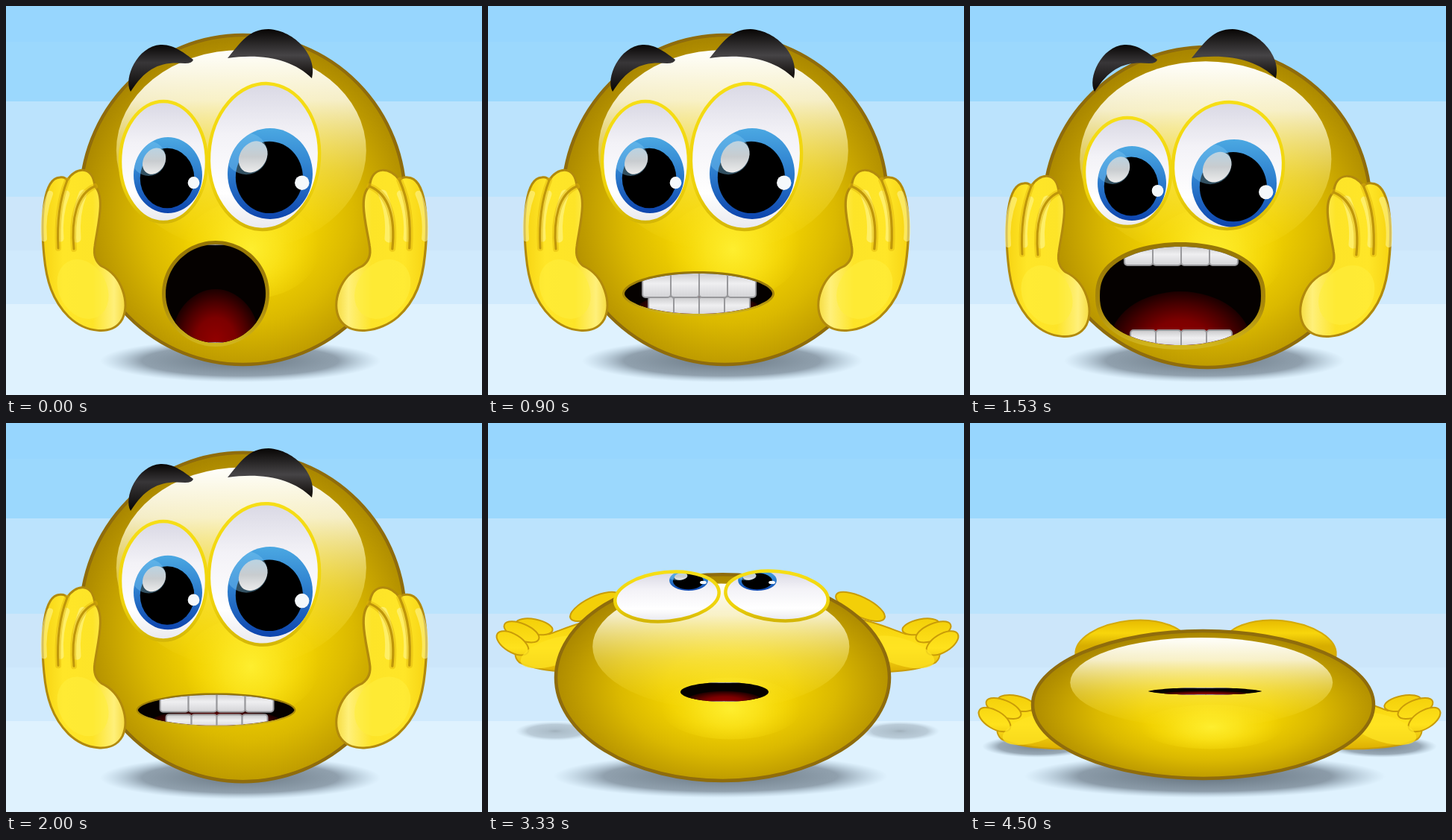
Recreate the animation shown at these times as an HTML page with a canvas. Size 638 by 522 pixels, loop 4.63 s.

```html
<!DOCTYPE html>
<html lang="en">
<head>
<meta charset="utf-8">
<title>Shocked smiley</title>
<style>
html, body { margin: 0; width: 100%; height: 100%; overflow: hidden; background: #bbe3fd; }
canvas { display: block; width: 638px; height: 522px; }
</style>
</head>
<body>
<canvas id="stage" width="638" height="522"></canvas>
<script>
const ctx = document.getElementById('stage').getContext('2d');
const LOOP = 4630;
const TAU = Math.PI * 2;

// head: left, right, top, bottom; eyes: cx, cy, rx, ry, tilt; irises: cx, cy, rx, ry
// mouth: cx, cy, rx, ry, power, upper teeth, lower teeth, rim width
// brow: dy, height; shadow: cx, cy, rx, ry, alpha
const calm = {
  head: [100, 535, 39, 481],
  eyeL: [211, 209, 58, 81, 0], eyeR: [346, 202, 74, 98, .06],
  irisL: [217, 227, 46, 51], irisR: [354, 225, 57, 61],
  mouth: [281, 386, 67, 66, 1, 0, 0, 5],
  brow: [0, 1], cheek: [0], side: [-200], lid: [0],
  shadow: [314, 476, 188, 29, .8]
};
const scream = {
  ...calm,
  head: [99, 537, 55, 485],
  eyeL: [211, 223, 58, 73, 0], eyeR: [346, 214, 74, 85, .06],
  irisL: [217, 238, 46, 50], irisR: [354, 238, 57, 59],
  mouth: [282, 389, 108, 66, .82, 25, 20, 6],
  cheek: [8]
};
const clenched = { ...calm, mouth: [282, 386, 99, 27, 1.1, 32, 23, 3] };
const dazed = {
  ...calm,
  eyeL: [211, 214, 58, 79, 0], eyeR: [346, 203, 74, 92, .06],
  irisL: [217, 227, 46, 48], irisR: [354, 227, 57, 60],
  mouth: [281, 384, 111, 8, 1.2, 12, 4, 1],
  brow: [7, 1]
};
const sinking = {
  ...calm,
  head: [91, 538, 203, 480],
  eyeL: [240, 233, 70, 33, -.1], eyeR: [387, 232, 69, 33, .1],
  irisL: [269, 211, 26, 14], irisR: [361, 211, 26, 14],
  mouth: [317, 361, 59, 13, 1, 0, 0, 0],
  brow: [135, 0], side: [-103],
  shadow: [312, 474, 224, 29, .8]
};
const tipping = {
  ...sinking,
  head: [87, 540, 231, 469],
  eyeL: [230, 236, 62, 0, -.1], eyeR: [402, 236, 62, 0, .1],
  irisL: [262, 230, 20, 0], irisR: [370, 230, 20, 0],
  mouth: [316, 344, 64, 10, 1.15, 0, 0, 0],
  side: [-35], lid: [.7]
};
const bounced = {
  ...tipping,
  head: [84, 541, 259, 457],
  mouth: [315, 328, 70, 8, 1.35, 0, 0, 0],
  side: [0], lid: [1],
  shadow: [313, 473, 240, 29, .95]
};
const flat = {
  ...bounced,
  head: [84, 541, 279, 477],
  mouth: [315, 360, 76, 5, 1.35, 0, 0, 0],
  shadow: [315, 474, 242, 29, .85]
};

const smooth = u => u * u * (3 - 2 * u);
const linear = u => u;
const speedUp = u => Math.pow(u, 1.4);
const slowDown = u => 1 - (1 - u) * (1 - u);

function blend(a, b, u) {
  const pose = {};
  for (const part in a) pose[part] = a[part].map((v, i) => v + (b[part][i] - v) * u);
  return pose;
}

// time, pose, easing toward that pose
const keys = [
  [30, calm],
  [450, { ...blend(calm, scream, .45), mouth: [281, 387, 86, 60, .9, 14, 10, 5] }, smooth],
  [900, clenched, smooth],
  [1530, scream, smooth],
  [2070, blend(clenched, dazed, .45), smooth],
  [2600, dazed, smooth],
  [2930, dazed, linear],
  [3330, sinking, speedUp],
  [3530, tipping, linear],
  [3730, bounced, linear],
  [4270, flat, slowDown]
];

function poseAt(t) {
  if (t <= keys[0][0]) return keys[0][1];
  for (let i = 1; i < keys.length; i++) {
    const [start, from] = keys[i - 1], [end, to, ease] = keys[i];
    if (t < end) return blend(from, to, ease((t - start) / (end - start)));
  }
  return flat;
}

function saved(draw) {
  ctx.save();
  draw();
  ctx.restore();
}

function ellipse(x, y, rx, ry, tilt = 0) {
  ctx.beginPath();
  ctx.ellipse(x, y, Math.max(rx, 0), Math.max(ry, 0), tilt, 0, TAU);
}

function paint(fill, stroke, width) {
  if (fill) { ctx.fillStyle = fill; ctx.fill(); }
  if (stroke) { ctx.strokeStyle = stroke; ctx.lineWidth = width; ctx.stroke(); }
}

function stops(gradient, list) {
  list.forEach(([at, color]) => gradient.addColorStop(at, color));
  return gradient;
}
const vertical = (y0, y1, ...list) => stops(ctx.createLinearGradient(0, y0, 0, y1), list);
const radial = (x, y, r, ...list) => stops(ctx.createRadialGradient(x, y, 0, x, y, r), list);

// Runs draw twice, the second time mirrored so that x becomes width - stretch * x.
function mirrored(width, draw, stretch = 1) {
  saved(draw);
  saved(() => {
    ctx.translate(width, 0);
    ctx.scale(-stretch, 1);
    draw();
  });
}

function background() {
  const bands = [[0, '#97d6fe'], [48, '#9bd8fd'], [128, '#bbe3fd'],
    [256, '#cce6fa'], [328, '#d0eafd'], [400, '#dff2fe']];
  for (const [y, color] of bands) {
    ctx.fillStyle = color;
    ctx.fillRect(0, y, 638, 522 - y);
  }
}

function shadow(x, y, rx, ry, alpha) {
  saved(() => {
    ctx.translate(x, y);
    ctx.scale(rx, ry);
    ctx.globalAlpha = alpha;
    ellipse(0, 0, 1, 1);
    paint(radial(0, 0, 1, [0, '#3a444e'], [.2, '#5c6a76'],
      [.7, 'rgba(92,106,120,.75)'], [1, 'rgba(140,165,185,0)']));
  });
}

function sideHand(dy) {
  ctx.translate(0, dy);
  const gold = vertical(364, 438, [0, '#f3cf08'], [.55, '#ffe21c'], [1, '#dcae00']);
  ellipse(143, 349, 36, 13, -.45);
  paint(gold, '#c99c08', 2);
  ctx.beginPath();
  ctx.moveTo(170, 436);
  ctx.bezierCurveTo(120, 440, 65, 436, 42, 424);
  ctx.bezierCurveTo(25, 408, 50, 384, 82, 386);
  ctx.bezierCurveTo(105, 378, 130, 366, 170, 362);
  paint(gold, '#c99c08', 2);
  for (const [x, y, rx, ry, tilt] of [[62, 376, 25, 10, .2], [45, 383, 25, 11, .4], [33, 398, 24, 12, .55]]) {
    ellipse(x, y, rx, ry, tilt);
    paint(gold, '#c99c08', 2);
  }
  ellipse(88, 410, 46, 18, -.3);
  paint('rgba(255,229,35,.75)');
}

function head([left, right, top, bottom]) {
  const w = (right - left) / 2, h = (bottom - top) / 2;
  const cx = left + w, cy = top + h;
  saved(() => {
    ctx.translate(cx, cy);
    ctx.scale(w, h);
    ellipse(0, 0, 1, 1);
    paint(radial(.03, .1, 1.08, [0, '#f8dc0a'], [.35, '#f0d000'], [.6, '#dbb900'],
      [.82, '#c09d00'], [1, '#a98600']));
    ellipse(.05, .3, .42, .3);
    paint(radial(.05, .3, .42, [0, 'rgba(255,241,52,.9)'], [.4, 'rgba(255,236,40,.6)'], [1, 'rgba(250,222,10,0)']));
    ellipse(-.01, -.3, .77, .61);
    paint(vertical(-.91, .31, [0, 'rgba(255,255,252,1)'], [.25, 'rgba(255,252,232,.86)'],
      [.6, 'rgba(255,241,130,.42)'], [1, 'rgba(255,230,40,0)']));
  });
  ellipse(cx, cy, w, h);
  paint(null, '#8f6c0c', 4.5);
}

function iris([x, y, rx, ry]) {
  ctx.translate(x, y);
  ctx.scale(rx, ry);
  ellipse(0, 0, 1, 1);
  paint(vertical(-1, 1, [0, '#4ba8e2'], [.45, '#2e80cf'], [1, '#0d44ad']));
  ctx.clip();
  ellipse(-.02, .08, .79, .79);
  paint('#000');
  ellipse(-.56, -.44, .5, .46);
  paint('rgba(125,200,242,.4)');
  ellipse(-.4, -.37, .3, .38, .75);
  paint(vertical(-.75, 0, [0, '#b9d4e4'], [.5, '#c8cccf'], [1, '#eeeeee']));
}

function eye([x, y, rx, ry, tilt], irisShape) {
  if (ry < 1) return;
  saved(() => {
    ellipse(x, y, rx, ry, tilt);
    paint(vertical(y - ry, y + ry, [0, '#d9d8e4'], [.35, '#f3f2f7'], [.75, '#ffffff'], [1, '#e9e9ee']));
    saved(() => {
      ctx.clip();
      saved(() => iris(irisShape));
      const [ix, iy, irx, iry] = irisShape;
      ellipse(ix + irx * .75, iy + iry * .2, irx * .17, iry * .16);
      paint('#f4f8fb');
    });
    ellipse(x, y, rx, ry, tilt);
    paint(null, vertical(y - ry, y + ry, [0, '#f6de16'], [.7, '#eed20a'], [1, '#d4b606']), 4.5);
  });
}

function brows([dy, height]) {
  if (height < .02) return;
  saved(() => {
    ctx.translate(0, 75 + dy);
    ctx.scale(1, height);
    ctx.translate(0, -75);
    ctx.beginPath();
    ctx.moveTo(167, 115);
    ctx.bezierCurveTo(157, 97, 176, 54, 207, 52);
    ctx.bezierCurveTo(225, 51, 240, 64, 251, 72);
    ctx.quadraticCurveTo(250, 77, 240, 77);
    ctx.bezierCurveTo(208, 74, 188, 82, 167, 115);
    paint(vertical(52, 112, [0, '#080605'], [.4, '#383638'], [1, '#0c0a08']));
    ctx.beginPath();
    ctx.moveTo(297, 70);
    ctx.bezierCurveTo(315, 48, 326, 31, 352, 31);
    ctx.bezierCurveTo(388, 33, 418, 68, 410, 97);
    ctx.bezierCurveTo(385, 72, 344, 63, 297, 70);
    paint(vertical(31, 95, [0, '#070504'], [.55, '#464446'], [1, '#110d0a']));
  });
}

function mouthPath(x, y, rx, ry, power) {
  ctx.beginPath();
  for (let i = 0; i < 96; i++) {
    const a = i / 96 * TAU, s = Math.sin(a);
    ctx.lineTo(x + rx * Math.cos(a), y + ry * Math.sign(s) * Math.pow(Math.abs(s), power));
  }
  ctx.closePath();
}

function teethRow(cx, y, height, cell) {
  if (height < 1) return;
  const fill = vertical(y, y + height, [0, '#c9c9cb'], [.45, '#efeff1'], [1, '#d3d3d6']);
  for (let i = -2; i < 2; i++) {
    ctx.beginPath();
    ctx.roundRect(cx + i * cell, y, cell, height, Math.min(4, height / 2));
    paint(fill, '#98989b', 2);
  }
}

function mouth([x, y, rx, ry, power, upper, lower, rim]) {
  saved(() => {
    mouthPath(x, y, rx, ry, power);
    if (rim > .2) paint(null, vertical(y - ry, y + ry, [0, '#967606'], [.6, '#a8880a'], [1, '#d0b41c']), rim * 2);
    paint('#050100');
    ctx.clip();
    saved(() => {
      ctx.translate(x, y + ry * .97);
      ctx.scale(rx * .88, ry * 1.06);
      ellipse(0, 0, 1, 1);
      paint(radial(0, 0, 1, [0, '#920000'], [.45, '#7c0000'], [.75, '#4a0000'], [1, '#1c0000']));
    });
    teethRow(x + 1, y + ry - lower, lower + 3, 34);
    teethRow(x + 1, y - ry - 2, upper + 2, 38);
  });
}

function cheekHand(swing) {
  ctx.lineCap = 'round';
  ctx.translate(130 - swing * 45, 420 - swing * 50);
  ctx.rotate(-swing * .75);
  ctx.scale(1 - swing * .2, 1 - swing * .3);
  ctx.translate(-130, -420);
  ctx.beginPath();
  ctx.moveTo(51, 335);
  ctx.bezierCurveTo(46, 285, 50, 231, 72, 230);
  ctx.quadraticCurveTo(79, 229, 82, 234);
  ctx.bezierCurveTo(92, 217, 116, 212, 119, 242);
  ctx.bezierCurveTo(134, 256, 122, 298, 119, 322);
  ctx.quadraticCurveTo(116, 340, 128, 349);
  ctx.bezierCurveTo(156, 362, 166, 398, 156, 420);
  ctx.bezierCurveTo(143, 444, 106, 438, 84, 417);
  ctx.bezierCurveTo(62, 395, 54, 368, 51, 335);
  const skin = stops(ctx.createLinearGradient(48, 0, 162, 0),
    [[0, '#f6d312'], [.25, '#ffe628'], [.6, '#fde428'], [.85, '#fff07a'], [1, '#f4d93a']]);
  paint(skin, '#b28a0c', 3);
  const finger = (x, y, ...curve) => {
    ctx.beginPath();
    ctx.moveTo(x, y);
    ctx.bezierCurveTo(...curve);
  };
  for (const [x, width] of [[-11, 8], [11, 9], [33, 11]]) {
    finger(70 + x, 252, 63 + x, 270, 60 + x, 290, 62 + x, 312);
    paint(null, 'rgba(255,249,165,.5)', width);
  }
  for (const [color, width] of [['rgba(222,178,10,.45)', 8], ['#bf960a', 3]]) {
    finger(82, 234, 71, 262, 68, 290, 70, 325);
    paint(null, color, width);
    finger(119, 242, 95, 252, 87, 285, 91, 326);
    paint(null, color, width);
  }
  ellipse(103, 380, 32, 42, -.5);
  paint('rgba(255,238,60,.6)');
}

function draw(t) {
  const p = poseAt(t);
  const top = p.head[2];
  const side = p.side[0];
  const lying = t >= 3120;
  background();
  if (lying) mirrored(642, () =>
    shadow(90, 434 + side * .2, 74 + side * .2, 15 + side * .02, Math.max(0, .72 + side / 300)));
  shadow(...p.shadow);
  if (lying) mirrored(642, () => sideHand(side));
  if (p.lid[0] > 0) mirrored(632, () => {
    ellipse(217, top + 25 + (1 - p.lid[0]) * 45, 76, 39, -.1);
    paint(vertical(top - 14, top + 20, [0, '#e7bb00'], [.5, '#f8d60c'], [1, '#d7ad00']), '#d4aa08', 2);
  });
  head(p.head);
  eye(p.eyeL, p.irisL);
  eye(p.eyeR, p.irisR);
  brows(p.brow);
  mouth(p.mouth);
  if (!lying) {
    const swing = Math.max(0, (t - 2930) / 190);
    mirrored(617, () => {
      ctx.translate(0, p.cheek[0]);
      cheekHand(swing);
    }, 1.09);
  }
}

const began = performance.now();
function tick() {
  draw((performance.now() - began) % LOOP);
  requestAnimationFrame(tick);
}
tick();
</script>
</body>
</html>
```
